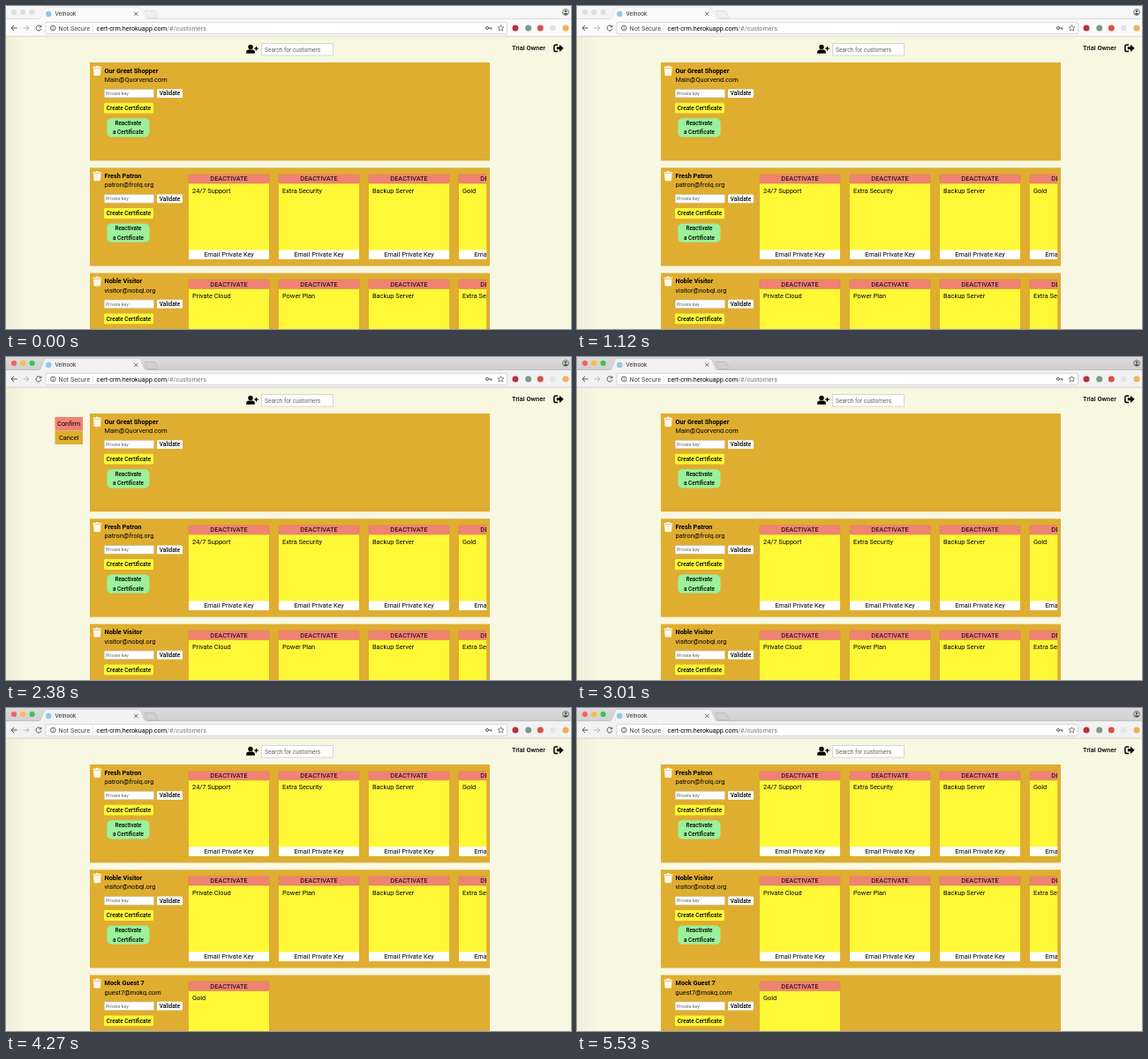
Animation of 640 by 366 pixels, one loop 5600 ms. Source, as an HTML page:

```html
<!DOCTYPE html>
<html lang="en">
<head>
<meta charset="utf-8">
<title>Customers</title>
<style>
  html, body { margin: 0; height: 100%; overflow: hidden; background: #f7f7e2; }
  svg { display: block; width: 640px; height: 366px; font: 7.4px Roboto, sans-serif; }
  .mid { text-anchor: middle; }
  .small { font-size: 6.4px; font-weight: 500; }
  .bold { font-weight: 700; font-size: 7.3px; }
  .inactive .light { fill: #dedede; }
  .inactive .bar { fill: #f6f6f6; }
  .inactive .tab { fill: #fafafa; }
  .inactive .edge { stroke: #d4d4d4; }
  .inactive .plus { fill: #f0f0f0; stroke: #d0d0d0; }
</style>
</head>
<body>
<svg id="stage" viewBox="0 0 640 366">
  <defs>
    <linearGradient id="bar" x2="0" y2="1">
      <stop stop-color="#dcdcdc"/><stop offset="1" stop-color="#cfcfcf"/>
    </linearGradient>
    <linearGradient id="shade">
      <stop stop-opacity=".035"/><stop offset="1" stop-opacity="0"/>
    </linearGradient>
    <clipPath id="scroll"><rect x="200" width="344.2" height="112"/></clipPath>
    <path id="trash" fill="#fdf8e4" d="M3.3 4.4h9.9v1.4H3.3zM6.4 4.6l.7-1.2h2.4l.7 1.2zM4 6.4h8.5l-.5 7.2q-.1.9-1 .9H5.5q-.9 0-1-.9z"/>
  </defs>
  <rect width="640" height="366" fill="#f7f7e2"/>
  <rect width="24" height="366" fill="url(#shade)"/>
  <g id="list"></g>
  <g id="popup">
    <rect x="55.5" y="68" width="31.5" height="15.5" fill="#f08274"/>
    <rect x="55.5" y="83.5" width="31.5" height="15.5" fill="#dfad30"/>
    <text class="mid" x="71.2" y="78.2">Confirm</text>
    <text class="mid" x="71.2" y="93.7">Cancel</text>
  </g>

  <!-- Page header -->
  <circle cx="277" cy="46.4" r="2.7"/>
  <path d="M272.2 53.8v-1.6q0-2.7 3-2.7h3.6q3 0 3 2.7v1.6z"/>
  <path d="M281.2 48.2h4.6m-2.3-2.3v4.6" stroke="#000" stroke-width="1.3"/>
  <rect x="289.5" y="42.5" width="81" height="13.5" fill="#fff" stroke="#ccc" stroke-width=".8"/>
  <text x="293" y="51.6" font-size="6.6" fill="#666">Search for customers</text>
  <text x="573" y="50.2" font-weight="500">Trial Owner</text>
  <path d="M625 44h-2.3q-1.8 0-1.8 1.8v4q0 1.8 1.8 1.8h2.3" fill="none" stroke="#000" stroke-width="1.5"/>
  <path d="M623.8 46.3h3.2v-2.6l4.6 4.1-4.6 4.1v-2.6h-3.2z"/>

  <!-- Browser window -->
  <rect class="bar" width="640" height="15" fill="url(#bar)"/>
  <rect class="tab" y="14.5" width="640" height="20" fill="#f2f2f2"/>
  <path class="edge" d="M0 14.5h37q2 0 2.7-1.8l3.6-9Q44 2 46 2h104q2 0 2.7 1.7l3.6 9q.7 1.8 2.7 1.8h481" fill="none" stroke="#b4b4b4" stroke-width=".7"/>
  <path class="tab" d="M37 15q2 0 2.7-2.3l3.6-9Q44 2 46 2h104q2 0 2.7 1.7l3.6 9Q157 15 159 15z" fill="#f2f2f2"/>
  <path class="plus" d="M157.5 5.5h10.2q1 0 1.4 1l2.6 6q.4 1-.7 1h-9.8q-1 0-1.4-1l-2.7-6q-.4-1 .4-1z" fill="#d0d0d0" stroke="#b0b0b0" stroke-width=".6"/>
  <circle class="light" cx="9" cy="7" r="3.1" fill="#fc605b"/>
  <circle class="light" cx="19.2" cy="7" r="3.1" fill="#fdbc40"/>
  <circle class="light" cx="29.6" cy="7" r="3.1" fill="#34c84a"/>
  <circle cx="48.3" cy="9" r="3.2" fill="#8ec9e6"/>
  <text x="55.5" y="11.3" font-size="6.7" fill="#333">Velnook</text>
  <path d="M145.2 6.8l4.2 4.2m0-4.2l-4.2 4.2" stroke="#555" stroke-width=".9"/>
  <circle cx="634" cy="7" r="3.4" fill="none" stroke="#555" stroke-width=".8"/>
  <circle cx="634" cy="6" r="1.3" fill="#555"/>
  <path d="M631.5 9.2q.4-1.5 2.5-1.5t2.5 1.5l-2.5 1z" fill="#555"/>
  <g fill="none" stroke="#555" stroke-width="1">
    <path d="M12.5 25H6m3-3l-3 3 3 3"/>
    <path d="M19.5 25H26m-3-3l3 3-3 3" stroke="#b5b5b5"/>
    <path d="M39.4 23.2a3 3 0 1 0 .5 2.6m0-4v2h-2.2"/>
  </g>
  <rect x="45" y="18.4" width="522.5" height="13.3" rx="1.8" fill="#fff" stroke="#c8c8c8" stroke-width=".7"/>
  <circle cx="53.3" cy="25" r="2.8" fill="none" stroke="#555" stroke-width=".9"/>
  <path d="M53.3 24.6v2m0-3.4v.8" stroke="#555" stroke-width=".9"/>
  <text x="59.6" y="27.6" font-size="7.2" fill="#444">Not Secure</text>
  <path d="M98.5 20.5v9" stroke="#ddd" stroke-width=".7"/>
  <text x="102.6" y="27.6" font-size="7.25">cert-crm.herokuapp.com<tspan fill="#777">/#/customers</tspan></text>
  <g fill="none" stroke="#555" stroke-width="1">
    <circle cx="545" cy="25" r="1.5"/><path d="M546.5 25h4m-1 0v1.7"/>
    <path d="M560.5 21.6l1 2.2 2.4.2-1.8 1.6.6 2.4-2.2-1.3-2.2 1.3.6-2.4-1.8-1.6 2.4-.2z" stroke-width=".7"/>
  </g>
  <circle cx="577" cy="25" r="3.5" fill="#b8323a"/>
  <circle cx="591.7" cy="25" r="3.5" fill="#7f9a84"/>
  <circle cx="605.3" cy="25" r="3.5" fill="#dc5146"/>
  <circle cx="619.3" cy="25" r="3.3" fill="#e4e4e4"/>
  <circle cx="634" cy="25" r="3.6" fill="#f3b056"/>
  <path d="M0 34.3h640" stroke="#ccc" stroke-width=".7"/>
</svg>
<script>
const LOOP = 5600, PITCH = 119.3;
const FOCUSED = 1540, POPUP_ON = 2065, POPUP_OFF = 2975, REMOVED = 3920;

const customers = [
  ["Our Great Shopper", "Main@Quorvend.com", []],
  ["Fresh Patron", "patron@frolq.org", ["24/7 Support", "Extra Security", "Backup Server", "Gold"]],
  ["Noble Visitor", "visitor@nobql.org", ["Private Cloud", "Power Plan", "Backup Server", "Extra Security"]],
  ["Mock Guest 7", "guest7@mokq.com", ["Gold"]],
];

const box = (x, y, w, h, fill, rx = 0, extra = "") =>
  `<rect x="${x}" y="${y}" width="${w}" height="${h}" fill="${fill}" rx="${rx}" ${extra}/>`;
const text = (x, y, label, cls = "") => `<text x="${x}" y="${y}" class="${cls}">${label}</text>`;

const certificate = (label, i) => {
  const x = 207 + i * 102, mid = x + 45.5;
  return box(x, 7.4, 91, 96.3, "#fff837", 1.2) +
    box(x, 7.4, 91, 10.4, "#f08274", 1.2, 'stroke="#c8823f" stroke-width=".5"') +
    box(x, 93.2, 91, 10.6, "#fff", 1) +
    text(mid, 15.2, "DEACTIVATE", "mid") +
    text(x + 4, 28.3, label) +
    text(mid, 101.1, "Email Private Key", "mid");
};

const card = ([name, email, certificates], i) =>
  `<g transform="translate(0 ${64 + i * PITCH})">` +
  box(95, 0, 453, 111.3, "#dfad30") +
  '<use href="#trash" x="95" y=".4"/>' +
  text(111.5, 11.6, name, "bold") +
  text(111.5, 22.1, email) +
  box(111.3, 30.4, 56.3, 9.4, "#fff", 0, 'stroke="#c9c2ae" stroke-width=".6"') +
  '<text x="113" y="37" font-size="5.35" fill="#666">Private key</text>' +
  box(171, 30.2, 29, 9.8, "#fff", 1.2) +
  text(185.5, 37.4, "Validate", "mid small") +
  box(111, 45.8, 56, 11.8, "#fff837", 1.5) +
  text(139, 54, "Create Certificate", "mid small") +
  box(114.3, 63.2, 48.2, 21.2, "#9bf29b", 5) +
  text(138.5, 71, "Reactivate", "mid small") +
  text(138.5, 81.4, "a Certificate", "mid small") +
  `<g clip-path="url(#scroll)">${certificates.map(certificate).join("")}</g></g>`;

const [stage, list, popup] = ["stage", "list", "popup"].map(id => document.getElementById(id));
list.innerHTML = customers.map(card).join("");

function draw() {
  const t = performance.now() % LOOP;
  const removed = t >= REMOVED;
  stage.classList.toggle("inactive", t < FOCUSED);
  popup.style.display = t >= POPUP_ON && t < POPUP_OFF ? "" : "none";
  list.firstChild.style.display = removed ? "none" : "";
  list.setAttribute("transform", `translate(0 ${removed ? -PITCH : 0})`);
  requestAnimationFrame(draw);
}
draw();
</script>
</body>
</html>
```
